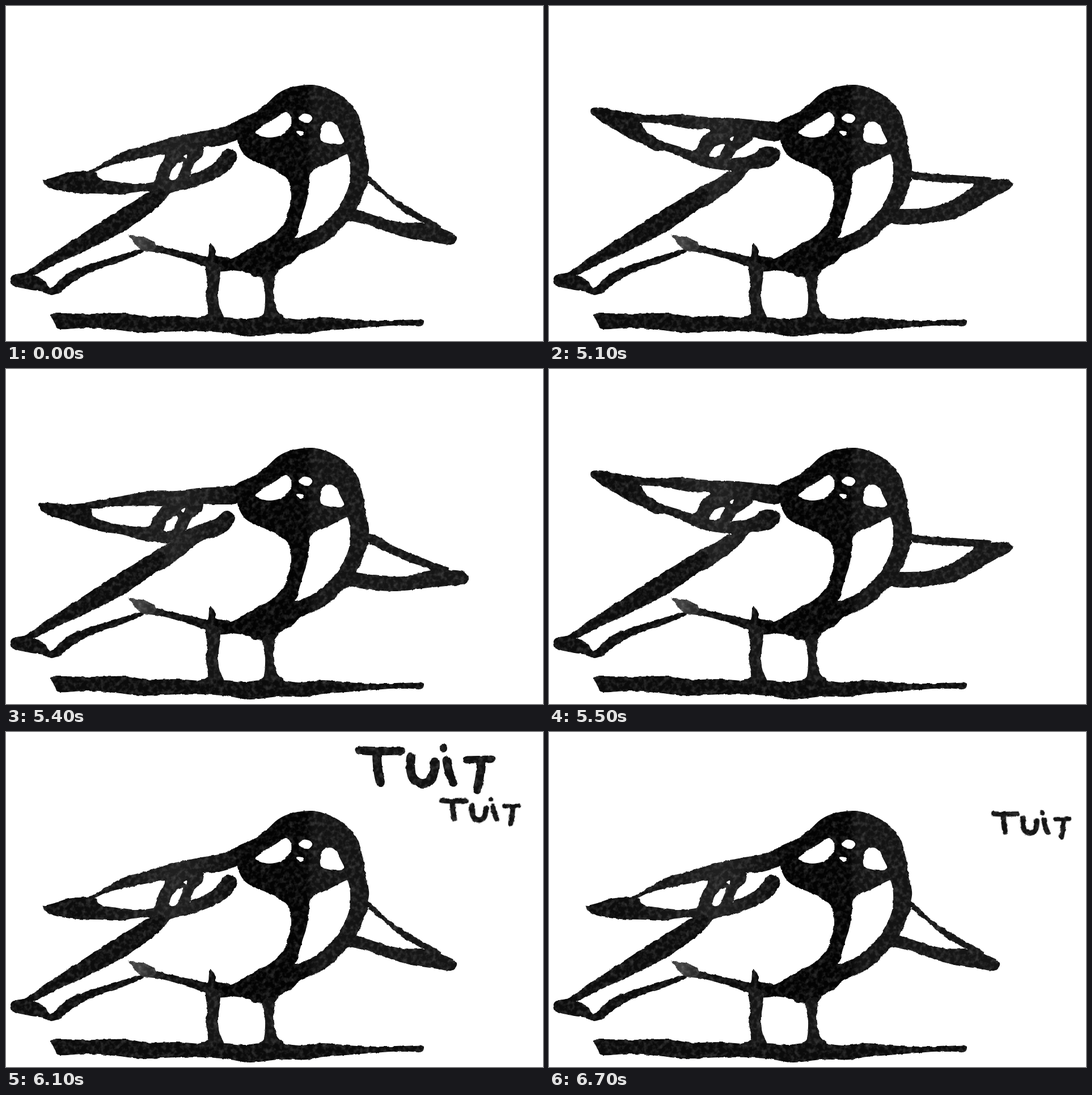
Animation of 947x591 px, one loop 6900 ms. Source, as an HTML page:

```html
<!DOCTYPE html>
<html lang="en">
<head>
<meta charset="utf-8">
<title>Tuit</title>
<style>
  html, body { margin: 0; width: 100%; height: 100%; overflow: hidden; background: #fff; }
  svg { display: block; width: 947px; height: 591px; }
  .word path { fill: none; stroke: #111; stroke-linecap: round; stroke-linejoin: round; }
</style>
</head>
<body>
<svg viewBox="0 0 947 591">
  <defs>
    <!-- rough brush edges and a faint wash inside the ink -->
    <filter id="ink" filterUnits="userSpaceOnUse" x="0" y="0" width="947" height="591" color-interpolation-filters="sRGB">
      <feTurbulence type="fractalNoise" baseFrequency=".1" numOctaves="2" seed="4" result="rough"/>
      <feDisplacementMap in="SourceGraphic" in2="rough" scale="4" xChannelSelector="R" yChannelSelector="G" result="shape"/>
      <feTurbulence type="fractalNoise" baseFrequency=".12" numOctaves="3" seed="9"/>
      <feColorMatrix values="0 0 0 0 1  0 0 0 0 1  0 0 0 0 1  .4 0 0 0 -.17"/>
      <feComposite in2="shape" operator="in" result="wash"/>
      <feMerge><feMergeNode in="shape"/><feMergeNode in="wash"/></feMerge>
    </filter>
    <linearGradient id="head" gradientUnits="userSpaceOnUse" x1="400" x2="660">
      <stop offset=".5" stop-color="#030303"/><stop offset=".55" stop-color="#131313"/>
    </linearGradient>
    <linearGradient id="wing" gradientUnits="userSpaceOnUse" x1="60" x2="410">
      <stop offset=".2" stop-color="#0c0c0c"/><stop offset=".7" stop-color="#202020"/><stop offset="1" stop-color="#0a0a0a"/>
    </linearGradient>
    <linearGradient id="belly" gradientUnits="userSpaceOnUse" x1="217" x2="300">
      <stop offset=".2" stop-color="#424242"/><stop offset=".8" stop-color="#0c0c0c"/>
    </linearGradient>
    <linearGradient id="dash">
      <stop offset="0" stop-color="#bbb"/><stop offset=".3" stop-color="#555"/><stop offset="1" stop-color="#3a3a3a"/>
    </linearGradient>
  </defs>
  <g id="art" filter="url(#ink)"></g>
</svg>
<script>
const art = document.getElementById('art');

function add(tag, attrs, parent) {
  const el = document.createElementNS('http://www.w3.org/2000/svg', tag);
  for (const k in attrs) el.setAttribute(k, attrs[k]);
  return parent.appendChild(el);
}

// Closed smooth curve through "x,y x,y ..."; a repeated point makes a corner.
function loop(text) {
  const p = text.trim().split(/\s+/).map(s => s.split(',').map(Number));
  const n = p.length, at = i => p[(i + n) % n];
  let d = 'M' + p[0];
  for (let i = 0; i < n; i++) {
    const [a, b, c, e] = [at(i - 1), at(i), at(i + 1), at(i + 2)];
    const c1 = b.map((v, k) => v + (c[k] - a[k]) / 6);
    const c2 = c.map((v, k) => v - (e[k] - b[k]) / 6);
    d += `C${c1} ${c2} ${c}`;
  }
  return d + 'Z';
}

const blob = (parent, fill, ...loops) =>
  add('path', { d: loops.map(loop).join(''), fill, 'fill-rule': 'evenodd' }, parent);

// Wing poses: low, middle, high. Each has a left part and a right part.
const poses = [0, 1, 2].map(() => add('g', {}, art));

blob(poses[0], 'url(#wing)',
  `412,203 380,215 345,221 300,230 250,245 210,256 180,272 150,289 110,294 85,302 65,307 65,307 69,316 85,324
   125,330 165,331 200,333 225,329 253,329 240,365 275,347 290,330 320,323 355,311 385,296 403,277 408,262 400,253
   385,255 372,272 350,288 326,298 326,298 330,282 346,264 349,249 349,249 375,246 404,238 430,230`,
  '158,292 158,292 185,281 230,271 272,263 280,266 270,285 263,305 258,311 225,314 195,310 168,305',
  '289,306 291,292 300,280 312,276 307,292 300,305', '313,265 319,262 318,269');
blob(poses[0], '#151515',
  `625,296 640,300 650,308 675,332 705,352 735,370 765,386 768,392 790,402 795,412 785,421 755,417 715,411
   680,401 640,387 612,380 595,375`,
  '640,312 640,312 665,333 700,362 734,382 734,382 700,382 665,374 630,363 618,359 618,359 628,335');

blob(poses[1], 'url(#wing)',
  `412,206 380,208 340,210 300,215 250,216 200,225 150,234 115,239 85,237 60,236 59,244 75,258 105,266 135,277
   170,287 205,292 235,301 275,307 286,308 286,308 253,328 240,365 275,354 300,338 325,318 345,303 375,294 395,280
   404,263 397,252 385,251 370,264 350,271 318,284 318,284 327,265 345,250 348,238 348,238 370,239 405,238 430,230`,
  '151,247 151,247 200,242 270,242 274,244 260,262 248,278 210,276 180,270 155,260',
  '279,284 285,268 300,259 303,264 295,282 285,286', '309,249 316,245 313,253');
blob(poses[1], '#151515',
  `625,288 638,290 655,295 685,313 720,327 760,344 780,350 782,354 805,357 815,368 808,380 775,383 735,387
   690,392 640,389 612,384 594,378`,
  '640,308 640,308 670,322 710,340 748,353 735,358 700,366 660,365 625,360 616,358 616,358 628,335');

blob(poses[2], 'url(#wing)',
  `415,207 380,203 330,198 280,196 230,191 190,193 150,189 120,184 90,179 75,181 75,190 90,203 115,217 140,233
   165,243 185,254 210,257 240,270 275,284 318,291 318,291 290,308 253,328 240,365 275,354 300,338 325,320 345,300
   355,288 375,287 395,280 408,265 405,253 390,248 375,250 355,263 322,269 322,269 332,255 355,240 360,232 360,232
   385,237 404,238 430,230`,
  '163,205 163,205 200,208 250,217 285,218 270,232 257,254 230,248 195,236 170,219',
  '283,265 290,251 303,244 309,246 300,263', '319,235 325,231 322,238');
blob(poses[2], '#151515',
  `625,288 638,290 655,294 700,297 740,300 775,302 782,307 805,305 818,314 810,325 785,337 750,358 715,375
   670,383 635,386 605,384 594,378`,
  '640,305 640,305 680,310 720,313 748,315 735,328 705,345 670,356 635,358 618,358 618,358 630,335');

// Tail
blob(art, '#0c0c0c',
  `8,482 14,474 38,468 70,445 100,425 150,392 190,366 225,345 253,328 278,325 275,347 245,372 215,393 180,412
   140,432 100,450 70,465 50,475 50,475 68,484 76,497 85,494 95,484 115,468 150,455 190,443 238,428 242,434 205,450
   165,463 130,480 110,493 95,505 80,510 65,504 40,500 12,493`);

// Belly line with the tuft and the top of the leg
blob(art, 'url(#belly)',
  `217,405 217,405 240,407 262,416 268,422 300,430 335,438 355,441 358,428 361,418 369,430 370,440 395,446
   400,464 377,468 353,460 310,446 275,436 245,432 236,428 225,417`);

// Head and breast
blob(art, 'url(#head)',
  `404,206 435,190 460,172 480,154 505,143 540,139 570,147 600,165 620,190 630,225 634,250 640,280 638,300 630,332
   616,360 598,384 575,408 550,425 520,437 505,452 483,464 474,477 440,478 425,470 395,466 375,467 370,443 395,446
   410,440 440,422 470,405 490,385 497,365 503,340 500,315 490,300 465,285 440,275 420,262 408,238`,
  `603,264 597,263 570,277 540,292 534,320 530,345 522,370 514,400 511,409 540,398 570,375 592,345 605,315 607,285`,
  '440,222 455,210 475,198 493,187 502,195 503,210 497,218 485,228 465,232 448,229',
  '516,197 524,190 536,192 540,199 533,206 521,204',
  '512,221 522,221 526,225 519,229',
  '557,211 570,204 580,208 590,225 596,241 580,244 560,240 554,232');

// Legs and ground
blob(art, '#141414', '353,455 355,490 352,515 356,540 345,550 365,558 384,550 376,530 374,500 377,460');
blob(art, '#141414', '453,474 457,510 455,540 447,550 470,558 490,551 477,535 472,500 474,470');
blob(art, '#0b0b0b',
  `79,545 90,542 150,543 210,542 250,548 300,547 345,550 384,549 420,552 450,549 490,550 520,553 560,549 620,554
   680,555 720,553 733,553 737,558 730,565 700,563 650,566 600,570 560,573 530,578 480,578 430,583 390,577
   350,574 300,574 240,576 190,571 140,568 95,570 86,560`);

// Air strokes above the wings
const dashes = add('g', {}, art);
blob(dashes, 'url(#dash)', '105,184 130,178 170,178 200,178 211,188 208,199 190,202 160,198 130,195 112,191');
blob(dashes, 'url(#dash)', '727,304 745,300 775,301 795,306 798,314 790,317 765,315 740,308');

// Brush-lettered call: [path, stroke width]
const letters = [
  ['M9 12Q30 15 82 13', 15], ['M40 18Q40 45 46 68', 16],
  ['M100 25Q97 54 106 64Q120 77 134 66Q142 56 142 34', 16],
  ['M157 8V9', 14], ['M163 30Q166 52 175 69', 15],
  ['M198 29L242 28', 13], ['M224 34Q222 60 217 82', 15],
];
const words = [0, 1].map(() => {
  const g = add('g', { class: 'word' }, art);
  for (const [d, w] of letters) add('path', { d, 'stroke-width': w }, g);
  return g;
});

const SMALL = .58;
// [start ms, wing pose, air strokes, words as x, y, scale]
const steps = [
  [0, 0, 0],
  [5000, 1, 0], [5100, 2, 0], [5200, 1, 1], [5300, 0, 1],
  [5400, 1, 0], [5500, 2, 0], [5600, 1, 1], [5700, 0, 1],
  [5800, 0, 0],
  [5900, 0, 0, [801, 7, SMALL]],
  [6100, 0, 0, [614, 20, 1], [764, 114, SMALL]],
  [6300, 0, 0, [612, 76, 1], [792, 176, SMALL]],
  [6500, 0, 0, [671, 44, 1], [803, 143, SMALL]],
  [6700, 0, 0, [778, 137, SMALL]],
];

const show = (el, on) => el.setAttribute('display', on ? 'inline' : 'none');
let current;

function draw(now) {
  const t = now % 6900;
  const step = steps.findLast(s => s[0] <= t) || steps[0];
  if (step !== current) {
    current = step;
    const [, pose, air, ...calls] = step;
    poses.forEach((g, i) => show(g, i === pose));
    show(dashes, air);
    words.forEach((g, i) => {
      show(g, calls[i]);
      if (!calls[i]) return;
      const [x, y, size] = calls[i];
      g.setAttribute('transform', `translate(${x} ${y}) scale(${size})`);
    });
  }
  requestAnimationFrame(() => draw(performance.now()));
}
draw(performance.now());
</script>
</body>
</html>
```
